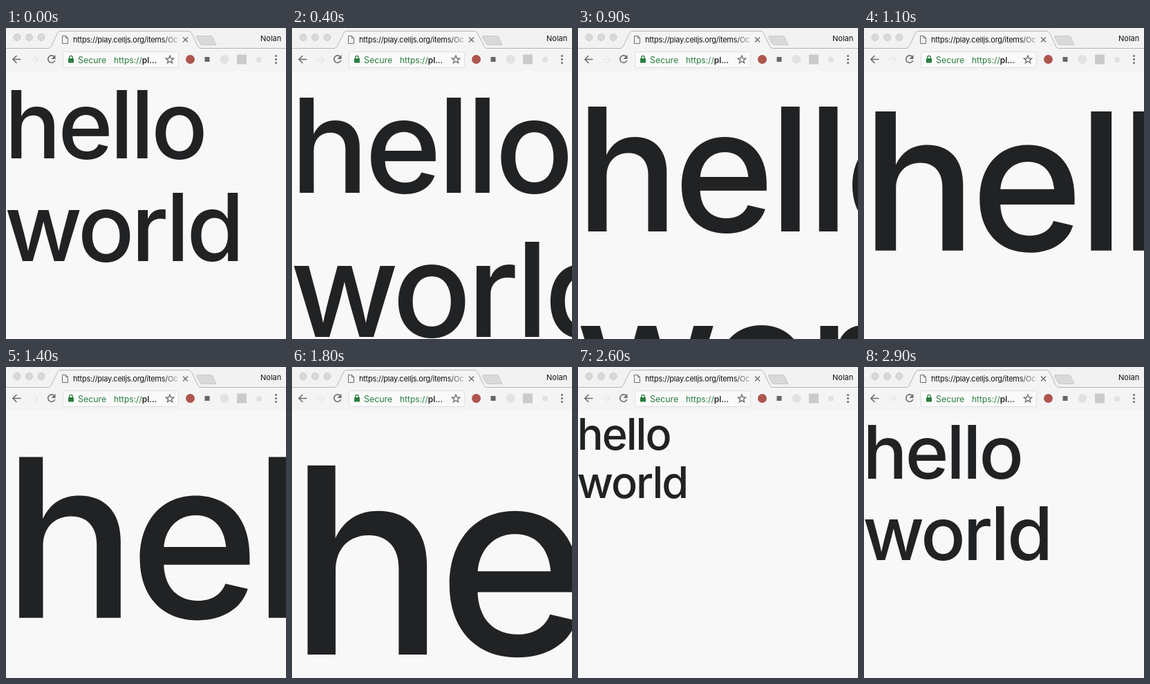
Recreate the animation shown at these times as an HTML page. Size 405x451 px, loop 3 s.

```html
<!DOCTYPE html>
<html lang="en">
<head>
<meta charset="utf-8">
<title>Growing hello world</title>
<style>
  html, body { margin: 0; width: 100%; height: 100%; overflow: hidden; background: #f8f8f8; }
  svg { display: block; width: 405px; height: 451px; }
  text { font-family: Inter, "Open Sans", sans-serif; font-optical-sizing: none; white-space: pre; }
  .big { font-weight: 500; letter-spacing: -.032em; fill: #212224; }
  .line { fill: none; stroke: #6c6c6c; stroke-width: 1.6; }
</style>
</head>
<body>
<svg viewBox="0 0 405 451">
  <defs>
    <linearGradient id="fade" gradientUnits="userSpaceOnUse" x1="225" x2="252" y1="0" y2="0">
      <stop stop-color="#111"/>
      <stop offset="1" stop-color="#111" stop-opacity=".15"/>
    </linearGradient>
  </defs>

  <rect width="405" height="451" fill="#f8f8f8"/>
  <text class="big">hello</text>
  <text class="big">world</text>

  <!-- tab strip -->
  <rect width="405" height="62" fill="#f4f4f4"/>
  <rect width="405" height="30" fill="#f2f2f2"/>
  <g fill="#d9d9d9" stroke="#c9c9c9">
    <circle cx="16" cy="13.5" r="5"/>
    <circle cx="33.5" cy="13.5" r="5"/>
    <circle cx="51" cy="13.5" r="5"/>
    <path d="M277 11.5H296Q298 11.5 299 13.5L304 24.5H284Q281.5 24.5 280.5 22.5L275.500 13.5Q275 11.5 277 11.5Z"/>
  </g>
  <path d="M-1 29.5H61Q64 29.5 65.500 26.5L74.500 7.500Q76 4.500 79 4.500H264Q267 4.500 268.500 7.500L277.500 26.5Q279 29.5 282 29.5H406V62.500H-1Z" fill="#f4f4f4"/>
  <path d="M0 29.5H61Q64 29.5 65.500 26.5L74.500 7.500Q76 4.500 79 4.500H264Q267 4.500 268.500 7.500L277.500 26.5Q279 29.5 282 29.5H405" fill="none" stroke="#b4b4b4"/>
  <path class="line" d="M81.500 11.5H86.500L89.500 14.5V22.500H81.500ZM86.500 11.5V14.5H89.500" style="stroke-width:1"/>
  <text x="97" y="21" font-size="11" letter-spacing="-.25" fill="url(#fade)">https://play.celljs.org/items/Oc</text>
  <path class="line" d="M256 13.5L263 20.500M263 13.5L256 20.500" style="stroke-width:1.4"/>
  <text x="368" y="18.500" font-size="11" fill="#111">Nolan</text>

  <!-- toolbar -->
  <path class="line" d="M21.500 45.500H10.500M15.500 40L10 45.500L15.500 51"/>
  <path class="line" d="M35 45.500H46M41 40L46.500 45.500L41 51" style="stroke:#e8e8e8"/>
  <path class="line" d="M69.700 41.500A5.200 5.200 0 1 0 70.800 47"/>
  <path d="M71.500 39V45H65.500Z" fill="#6c6c6c"/>
  <rect x="82.500" y="34.500" width="167" height="23" rx="3" fill="#fafafa" stroke="#dedede"/>
  <g fill="#2b7d40">
    <rect x="90" y="44" width="8" height="6.500" rx=".6"/>
    <path d="M91.800 44.500V42.500A2.200 2.200 0 0 1 96.200 42.500V44.500" fill="none" stroke="#2b7d40" stroke-width="1.3"/>
    <text x="104" y="50.500" font-size="12.4">Secure</text>
    <text x="156" y="50.500" font-size="12">https://<tspan fill="#111" font-weight="500">pl...</tspan></text>
  </g>
  <path class="line" d="M237 40L238.600 44L242.700 44.200L239.500 46.800L240.600 50.800L237 48.500L233.400 50.800L234.500 46.800L231.300 44.200L235.400 44Z" style="stroke-width:1.3"/>

  <!-- extensions -->
  <circle cx="266.500" cy="45.500" r="6.500" fill="#ad554e"/>
  <rect x="287.500" y="42" width="7" height="7" fill="#666"/>
  <circle cx="316" cy="45.500" r="6.500" fill="#e2e2e2"/>
  <rect x="334" y="38.500" width="14" height="14" fill="#cacaca"/>
  <circle cx="366" cy="46" r="4" fill="#e0e0e0"/>
  <g fill="#6c6c6c">
    <circle cx="390.500" cy="40.500" r="1.5"/>
    <circle cx="390.500" cy="45.500" r="1.5"/>
    <circle cx="390.500" cy="50.500" r="1.5"/>
  </g>
</svg>
<script>
  const LOOP = 3000, STEP = 100;
  const TOP = 60.5, BASELINE = 1.269, LINE_HEIGHT = 1.476, FONT_SIZE = 1.342; // last three per letter height
  // [step, letter height in px]: steady growth, then a jump back
  const keys = [[0, 101], [4, 141], [9, 185], [14, 239], [18, 281], [23, 332], [24, 25], [29, 80]];
  const lines = document.querySelectorAll('.big');

  function heightAt(step) {
    const next = Math.max(1, keys.findIndex(([at]) => at >= step));
    const [t0, h0] = keys[next - 1], [t1, h1] = keys[next];
    return h0 + (h1 - h0) * (step - t0) / (t1 - t0);
  }

  function draw() {
    const step = Math.floor(performance.now() % LOOP / STEP);
    const height = heightAt(step);
    lines.forEach((line, i) => {
      line.setAttribute('font-size', height * FONT_SIZE);
      line.setAttribute('x', -0.5 - 0.015 * height);
      line.setAttribute('y', TOP + height * (BASELINE + i * LINE_HEIGHT));
    });
    requestAnimationFrame(draw);
  }
  draw();
</script>
</body>
</html>
```
